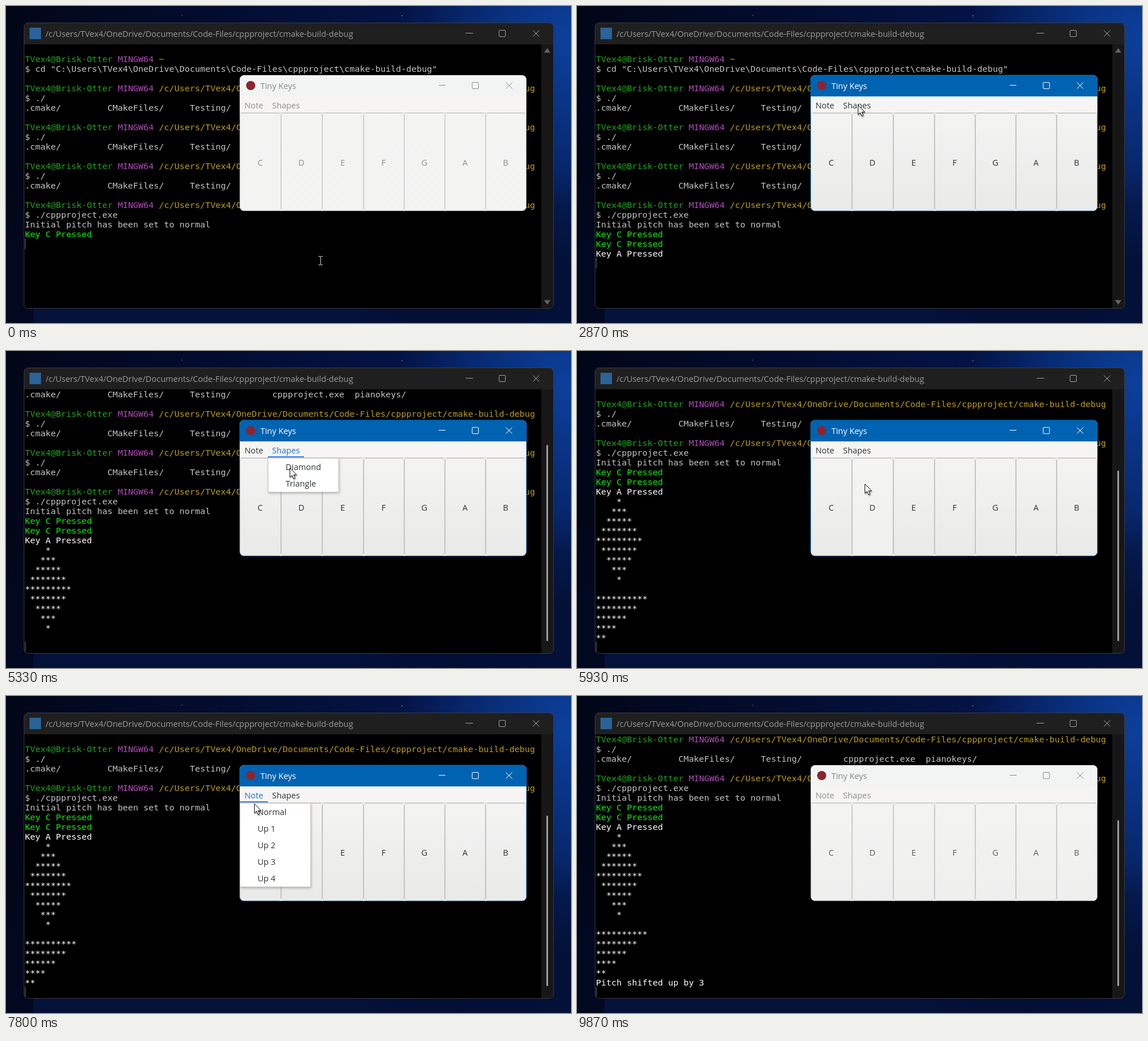
Write an HTML page that moves like this. It is 986 by 554 pixels and loops after 9940 ms.

```html
<!DOCTYPE html>
<html lang="en">
<head>
<meta charset="utf-8">
<title>Piano keys demo</title>
<style>
html, body { margin: 0; width: 100%; height: 100%; overflow: hidden; }
body {
  position: relative;
  font: 14.4px "Open Sans", "Noto Sans", sans-serif;
  background:
    radial-gradient(circle at 691px 17px, #3f62ad 0 1px, transparent 1.5px),
    radial-gradient(circle at 307px 16px, #24407c 0 1px, transparent 1.5px),
    linear-gradient(90deg, transparent 48px, #041139 48px 60%, transparent 92%) bottom / 100% 25px no-repeat,
    radial-gradient(ellipse 300px 290px at 985px 60px, #0c409c, transparent),
    linear-gradient(transparent 50%, rgba(2, 9, 36, .65) 80%),
    linear-gradient(90deg, #020617, #030b2b 30%, #041448 75%, #06205f);
}
div, svg, pre { position: absolute; box-sizing: border-box; }
svg { left: 0; top: 0; width: 986px; height: 554px; fill: none; }

#term {
  left: 31px; top: 29px; width: 925px; height: 500px;
  border: 1px solid #3b3b3d; border-radius: 8px;
  background: #1f1f1f; overflow: hidden;
}
#term .logo { left: 9px; top: 8px; width: 20px; height: 20px; background: #2a6398; }
#term .title { left: 37px; top: 0; line-height: 37px; color: #9a9a9a; white-space: nowrap; }
#screen { left: 0; top: 37px; width: 902px; height: 461px; background: #000; overflow: hidden; }
#bar { left: 902px; top: 37px; width: 21px; height: 461px; background: #171717; }
#thumb { left: 942.5px; width: 3px; border-radius: 2px; background: #9b9b9b; }
#text {
  margin: 1px 0 0; left: 1px; top: 0; color: #c4c4c4;
  font: 14.95px/17px "DejaVu Sans Mono", monospace;
}
#text div { position: static; height: 17px; white-space: pre; }
#caret { left: 1px; width: 1px; height: 17px; background: repeating-linear-gradient(#c8c8c8 0 1px, #000 1px 2px); }
.g { color: #1fa51a; } .m { color: #b44bbc; } .y { color: #bd9e18; }
.lime { color: #0bee0b; } .white { color: #fff; }

#app {
  left: 408px; top: 121px; width: 500px; height: 237px;
  border-radius: 8px; background: #f6f5f4; color: var(--ink);
  box-shadow: 0 0 0 1px var(--edge);
}
#app .head { left: 0; top: 0; width: 500px; height: 37px; border-radius: 8px 8px 0 0; background: var(--head); color: var(--name); }
#app .logo { left: 11px; top: 10px; width: 16px; height: 16px; border-radius: 50%; background: #8c2430; }
#app .title { left: 36px; line-height: 37px; white-space: nowrap; }
.tab { top: 37px; height: 29px; line-height: 31px; text-align: center; }
.tab.open { color: #2070c8; box-shadow: inset 0 -3px #3584e4; }
#keys { left: 0; top: 65px; width: 500px; height: 172px; border-top: 1px solid #d3cfcb; border-radius: 0 0 8px 8px; overflow: hidden; }
.key { top: 0; height: 171px; line-height: 172px; padding-right: 1px; text-align: center; border: 1px solid #c9c6c3; border-radius: 5px; }
.menu { top: 187px; border: 1px solid #cdc9c6; background: #fff; color: #2e3436; box-shadow: 1px 2px 4px rgba(0, 0, 0, .25); }
.menu div { position: static; height: 29px; line-height: 30px; padding-left: 30px; }
#arrow { filter: drop-shadow(1px 2px 1px rgba(0, 0, 0, .4)); }
</style>
</head>
<body>
<div id="term">
  <div class="logo"></div>
  <div class="title" id="path"></div>
  <div id="screen"><pre id="text"></pre><div id="caret"></div></div>
  <div id="bar"></div>
</div>
<svg stroke="#a2a2a2">
  <path d="M802 47.5h13M919.5 42.5l11 11m0-11l-11 11"/>
  <rect x="860.5" y="42.5" width="11" height="11" rx="1.5"/>
  <path id="arrows" fill="#626262" stroke="none" d="M939 81.5h11l-5.5-8zM939 514h11l-5.5 8z"/>
</svg>
<div id="thumb"></div>

<div id="app">
  <div class="head"><div class="logo"></div><div class="title">Tiny Keys</div></div>
  <div class="tab" id="noteTab" style="left:0;width:49px">Note</div>
  <div class="tab" id="shapesTab" style="left:49px;width:63px">Shapes</div>
  <div id="keys"></div>
</div>
<svg id="controls">
  <path d="M755 138.5h12M872.5 133.5l11 11m0-11l-11 11"/>
  <rect x="813.5" y="133.5" width="11" height="11" rx="1.5"/>
</svg>
<div class="menu" id="noteMenu" style="left:408px;width:124px">
  <div>Normal</div><div>Up 1</div><div>Up 2</div><div>Up 3</div><div>Up 4</div>
</div>
<div class="menu" id="shapesMenu" style="left:457px;width:124px">
  <div>Diamond</div><div>Triangle</div>
</div>
<svg>
  <g id="pointer">
    <path id="arrow" fill="#fff" stroke="#111" d="M.5-.5v16.2l3.7-3.5 2.7 6 2.6-1.2-2.6-5.7h5.2z"/>
    <path id="beam" stroke="#eee" d="M-3.5-7.5h3m1 0h3M-3.5 7.5h3m1 0h3M0-7V7"/>
  </g>
</svg>

<script>
const LOOP = 9940, STEP = 1000 / 15, ROWS = 27, LINE = 17;
const $ = id => document.getElementById(id);
const path = '/c/Users/TVex4/OneDrive/Documents/Code-Files/cppproject/cmake-build-debug';

// Terminal text
const span = (cls, s) => `<span class="${cls}">${s}</span>`;
const prompt = dir => `${span('g', 'TVex4@Brisk-Otter')} ${span('m', 'MINGW64')} ${span('y', dir)}`;
const listing = ['.cmake/', 'CMakeFiles/', 'Testing/', 'cppproject.exe', 'pianokeys/']
  .map(s => s.padEnd(16)).join('');
const white = s => span('white', s);
const keyC = span('lime', 'Key C Pressed');
const tries = Array(3).fill([prompt(path), '$ ./', listing, '']).flat();
const diamond = Array.from({ length: 9 }, (_, i) => {
  const gap = Math.abs(4 - i);
  return white(' '.repeat(gap) + '*'.repeat(9 - 2 * gap));
});
const triangle = Array.from({ length: 5 }, (_, i) => white('*'.repeat(10 - 2 * i)));
const lines = [
  '', prompt('~'), `$ cd "C:${path.slice(2).replaceAll('/', '\\')}"`, '', ...tries,
  prompt(path), '$ ./cppproject.exe', 'Initial pitch has been set to normal',
  keyC, keyC, white('Key A Pressed'), ...diamond, '', ...triangle, white('Pitch shifted up by 3')
];
$('path').textContent = path;
$('text').innerHTML = lines.map(s => `<div>${s}</div>`).join('');
const rows = [...$('text').children];

// Piano keys
const edges = [0, 72, 144, 216, 287, 358, 429, 500];
const keys = [...'CDEFGAB'].map((name, i) => {
  const el = document.createElement('div');
  el.className = 'key';
  el.textContent = name;
  el.style.left = edges[i] + 'px';
  el.style.width = edges[i + 1] - edges[i] + 'px';
  $('keys').append(el);
  return el;
});

// Timeline: [time, value] pairs and [start, end] spans
const printed = [[0, 20], [1330, 21], [2260, 22], [4000, 32], [5800, 37], [8320, 38]];
const shapesOpen = [[2930, 4000], [4730, 5800], [6640, 7470]];
const noteOpen = [[7470, 8320]];
const focused = [[1200, 9795]];
const pressed = { 0: [[1200, 1400]], 5: [[2130, 2260]] };
const track = [
  [330, 549, 445], [1130, 464, 250], [1500, 464, 250], [2060, 800, 285], [2300, 800, 285],
  [2860, 490, 174], [3300, 490, 174], [3800, 492, 205], [4200, 492, 205], [4650, 488, 174],
  [5000, 488, 174], [5650, 502, 233], [6300, 502, 233], [6580, 492, 174], [6960, 517, 229],
  [7150, 517, 229], [7530, 432, 174], [7700, 432, 174], [8150, 438, 296], [8400, 438, 296],
  [8870, 450, 270], [9130, 450, 270], [9400, 485, 101]
];

const within = (spans, t) => !!spans && spans.some(([a, b]) => t >= a && t < b);
const mix = (a, b, k) => a + (b - a) * k;
const grey = v => `rgb(${v},${v - .5},${v - 1})`;

function pointerAt(t) {
  const i = track.findIndex(p => p[0] > t);
  if (i < 0) return track.at(-1).slice(1);
  if (i === 0) return track[0].slice(1);
  const [t0, x0, y0] = track[i - 1], [t1, x1, y1] = track[i];
  const k = (t - t0) / (t1 - t0), e = k * k * (3 - 2 * k);
  return [mix(x0, x1, e), mix(y0, y1, e)];
}

const menuOpen = t => within(shapesOpen, t) || within(noteOpen, t);
function hovered(i, t) {
  const [x, y] = pointerAt(t);
  return !menuOpen(t) && y > 187 && y < 358 && x >= 408 + edges[i] && x < 408 + edges[i + 1];
}

// Linear fade: share of the last 160 ms in which the state held
function fade(state, t) {
  let sum = 0;
  for (let d = 0; d < 160; d += 20) sum += state((t - d + LOOP) % LOOP);
  return sum / 8;
}

function drawTerminal(t) {
  const n = printed.findLast(p => p[0] <= t)[1];
  const scroll = Math.max(0, n + 1 - ROWS);
  rows.forEach((el, i) => { el.style.visibility = i < n ? '' : 'hidden'; });
  $('text').style.top = -scroll * LINE + 'px';
  $('caret').style.top = (n - scroll) * LINE + 'px';
  const h = 419 * ROWS / (ROWS + scroll);
  $('thumb').style.top = 507 - h + 'px';
  $('thumb').style.height = h + 'px';
  $('thumb').style.display = scroll ? '' : 'none';
  $('arrows').style.display = scroll ? 'none' : '';
}

function drawApp(t) {
  const on = within(focused, t);
  const lit = fade(u => within(focused, u), t);
  const style = $('app').style;
  style.setProperty('--head', on ? '#0063b1' : '#f2f4f3');
  style.setProperty('--edge', on ? 'rgba(0,99,177,.7)' : 'rgba(110,110,110,.4)');
  style.setProperty('--name', on ? '#fff' : '#858585');
  style.setProperty('--ink', on ? '#2e3436' : '#8b8e8f');
  $('controls').style.stroke = on ? '#fff' : '#8b8b8b';
  keys.forEach((el, i) => {
    const hover = fade(u => hovered(i, u), t) * lit;
    const down = fade(u => within(pressed[i], u), t);
    const shade = (rest, over) => grey(mix(mix(mix(244, rest, lit), over, hover), 235, down));
    el.style.background = `linear-gradient(${shade(244, 245)}, ${shade(234, 241)})`;
    el.style.color = grey(mix(141, 48, lit));
    el.style.borderColor = grey(mix(209, 196, lit));
  });
  for (const [name, spans] of [['note', noteOpen], ['shapes', shapesOpen]]) {
    const open = within(spans, t);
    $(name + 'Tab').classList.toggle('open', open);
    $(name + 'Menu').style.display = open ? '' : 'none';
  }
}

function drawPointer(t) {
  const [x, y] = pointerAt(t).map(Math.round);
  const inside = x >= 408 && x < 908 && y >= 120 && y < 358;
  $('pointer').setAttribute('transform', `translate(${x} ${y})`);
  $('pointer').style.display = t < 9400 ? '' : 'none';
  $('arrow').style.display = inside ? '' : 'none';
  $('beam').style.display = inside ? 'none' : '';
}

function draw() {
  const now = performance.now() % LOOP;
  const t = Math.floor((now + 5) / STEP) * STEP;
  drawTerminal(t);
  drawApp(t);
  drawPointer(t);
  requestAnimationFrame(draw);
}
draw();
</script>
</body>
</html>
```
